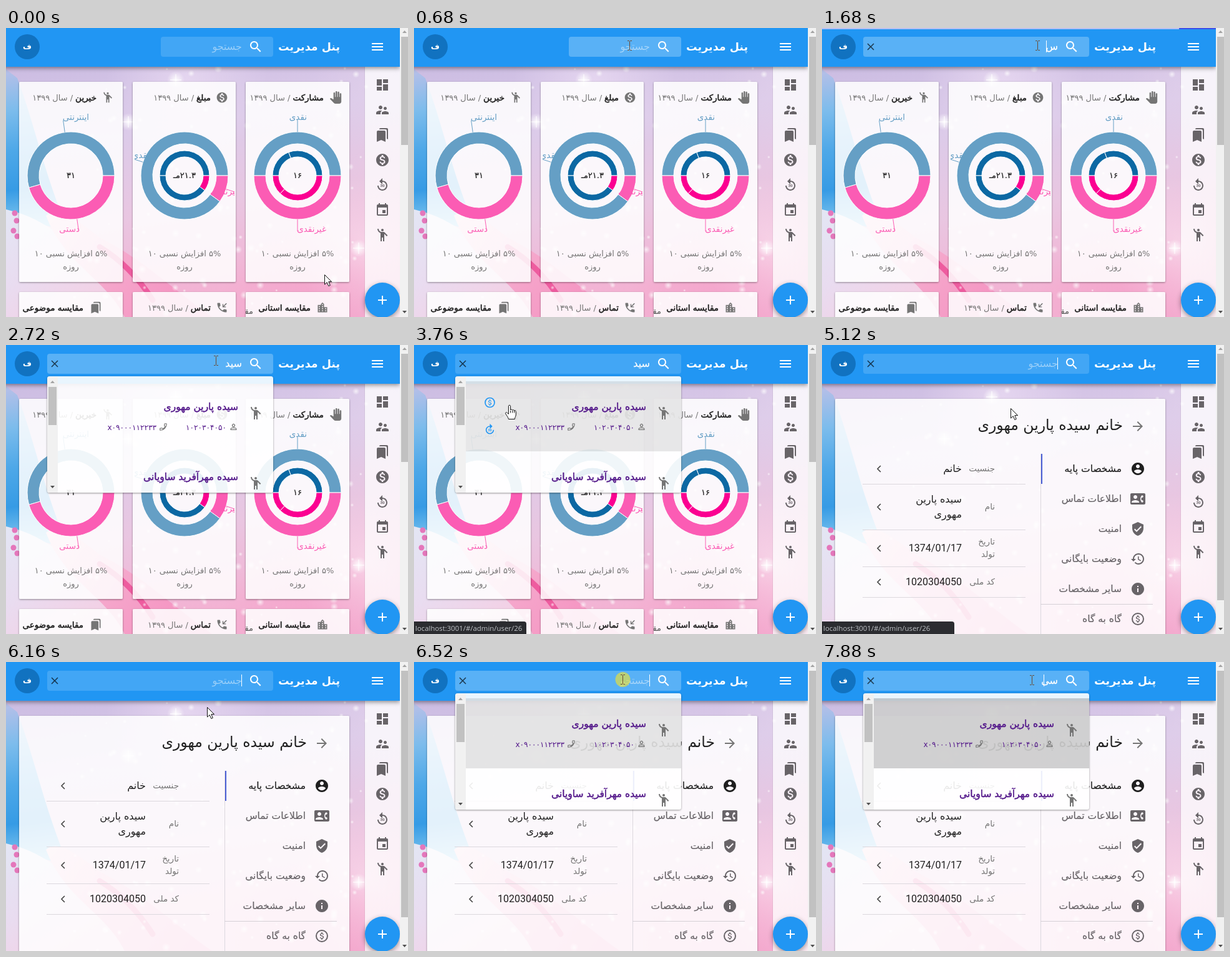
Recreate the animation shown at these times as an HTML page with a canvas. Size 644 px wide and 462 px high, loop 8 s.

```html
<!DOCTYPE html>
<html lang="fa">
<head>
<meta charset="utf-8">
<title>پنل مدیریت</title>
<style>
html, body { margin: 0; width: 100%; height: 100%; overflow: hidden; }
canvas { display: block; width: 644px; height: 462px; }
</style>
</head>
<body>
<canvas id="stage" width="644" height="462"></canvas>
<script>
const W = 644, H = 462, LOOP = 8000;
const screen2d = document.getElementById('stage').getContext('2d');
let c = screen2d;

const FA = '"DejaVu Sans", sans-serif';
const LATIN = 'Roboto, "DejaVu Sans", sans-serif';
const GREY = '#757575', INK = '#1f1f1f', PURPLE = '#551a8b';
const BLUE = '#2196f3', SKY = '#659fc5', ROSE = '#fb5cb4', NAVY = '#0c68a3', HOT = '#fb0091';

const PERSON = ['سیده پارین', 'مهوری'];
const FULL = PERSON.join(' ');
const SECOND = 'سیده مهرآفرید ساویانی';

const disc = 'M12 2C6.48 2 2 6.48 2 12s4.48 10 10 10 10-4.48 10-10S17.52 2 12 2z';
const dollar = 'M13.41 18.09V20h-2.67v-1.93c-1.71-.36-3.16-1.46-3.27-3.4h1.96c.1 1.05.82 1.87 2.65 1.87 1.96 0 2.4-.98 2.4-1.59 0-.83-.44-1.61-2.67-2.14-2.48-.6-4.18-1.62-4.18-3.67 0-1.72 1.39-2.84 3.11-3.21V4h2.67v1.95c1.86.45 2.79 1.86 2.85 3.39H14.3c-.05-1.11-.64-1.87-2.22-1.87-1.5 0-2.4.68-2.4 1.64 0 .84.65 1.39 2.67 1.91s4.18 1.39 4.18 3.91c-.01 1.83-1.38 2.83-3.12 3.16z';
const handset = 'M20 15.5c-1.25 0-2.45-.2-3.57-.57-.35-.11-.74-.03-1.02.24l-2.2 2.2c-2.83-1.44-5.15-3.75-6.59-6.59l2.2-2.21c.28-.26.36-.65.25-1C8.7 6.45 8.5 5.25 8.5 4c0-.55-.45-1-1-1H4c-.55 0-1 .45-1 1 0 9.39 7.61 17 17 17 .55 0 1-.45 1-1v-3.5c0-.55-.45-1-1-1z';
const shapes = {
  menu: 'M3 18h18v-2H3v2zm0-5h18v-2H3v2zm0-7v2h18V6H3z',
  search: 'M15.5 14h-.79l-.28-.27C15.41 12.59 16 11.11 16 9.5 16 5.91 13.09 3 9.5 3S3 5.91 3 9.5 5.91 16 9.5 16c1.61 0 3.09-.59 4.23-1.57l.27.28v.79l5 4.99L20.49 19l-4.99-5zm-6 0C7.01 14 5 11.99 5 9.5S7.01 5 9.5 5 14 7.01 14 9.5 11.99 14 9.5 14z',
  close: 'M19 6.41L17.59 5 12 10.59 6.41 5 5 6.41 10.59 12 5 17.59 6.41 19 12 13.41 17.59 19 19 17.59 13.41 12z',
  add: 'M19 13h-6v6h-2v-6H5v-2h6V5h2v6h6v2z',
  board: 'M3 13h8V3H3v10zm0 8h8v-6H3v6zm10 0h8V11h-8v10zm0-18v6h8V3h-8z',
  people: 'M16.5 12c1.38 0 2.49-1.12 2.49-2.5S17.88 7 16.5 7C15.12 7 14 8.12 14 9.5s1.12 2.5 2.5 2.5zM9 11c1.66 0 2.99-1.34 2.99-3S10.66 5 9 5C7.34 5 6 6.34 6 8s1.34 3 3 3zm7.5 3c-1.83 0-5.5.92-5.5 2.75V19h11v-2.25c0-1.83-3.67-2.75-5.5-2.75zM9 13c-2.33 0-7 1.17-7 3.5V19h7v-2.25c0-.85.33-2.34 2.37-3.47C10.5 13.1 9.66 13 9 13z',
  marks: 'M19 18l2 1V3c0-1.1-.9-2-2-2H8.99C7.89 1 7 1.9 7 3h10c1.1 0 2 .9 2 2v13zM15 5H5c-1.1 0-2 .9-2 2v16l7-3 7 3V7c0-1.1-.9-2-2-2z',
  money: disc + dollar,
  replay: 'M12 5V1L7 6l5 5V7c3.3 0 6 2.7 6 6s-2.7 6-6 6-6-2.7-6-6H4c0 4.4 3.6 8 8 8s8-3.6 8-8-3.6-8-8-8z',
  event: 'M17 12h-5v5h5v-5zM16 1v2H8V1H6v2H5c-1.11 0-1.99.9-1.99 2L3 19c0 1.1.89 2 2 2h14c1.1 0 2-.9 2-2V5c0-1.1-.9-2-2-2h-1V1h-2zm3 18H5V8h14v11z',
  waver: 'M14 4a2 2 0 1 1-4 0a2 2 0 1 1 4 0zM15.89 8.11C15.5 7.72 14.83 7 13.53 7h-2.54C8.24 6.99 6 4.75 6 2H4c0 3.16 2.11 5.84 5 6.71V22h2v-6h2v6h2V10.05L18.95 14l1.41-1.41-4.47-4.48z',
  palm: 'M23 5.5V20c0 2.2-1.8 4-4 4h-7.3c-1.08 0-2.1-.43-2.85-1.19L1 14.83s1.26-1.23 1.3-1.25c.22-.19.49-.29.79-.29.22 0 .42.06.6.16.04.01 4.31 2.46 4.31 2.46V4c0-.83.67-1.5 1.5-1.5S11 3.17 11 4v7h1V1.5c0-.83.67-1.5 1.5-1.5S15 .67 15 1.5V11h1V2.5c0-.83.67-1.5 1.5-1.5s1.5.67 1.5 1.5V11h1V5.5c0-.83.67-1.5 1.5-1.5s1.5.67 1.5 1.5z',
  city: 'M15 11V5l-3-3-3 3v2H3v14h18V11h-6zm-8 8H5v-2h2v2zm0-4H5v-2h2v2zm0-4H5V9h2v2zm6 8h-2v-2h2v2zm0-4h-2v-2h2v2zm0-4h-2V9h2v2zm0-4h-2V5h2v2zm6 12h-2v-2h2v2zm0-4h-2v-2h2v2z',
  callback: handset + 'M20 3.4L14.6 8.8V5H13v6.5h6.5V10H16l5.4-5.4z',
  forward: 'M12 4l-1.41 1.41L16.17 11H4v2h12.17l-5.58 5.59L12 20l8-8z',
  account: disc + 'M12 5c1.66 0 3 1.34 3 3s-1.34 3-3 3-3-1.34-3-3 1.34-3 3-3zm0 14.2c-2.5 0-4.71-1.28-6-3.22.03-1.99 4-3.08 6-3.08 1.99 0 5.97 1.09 6 3.08-1.29 1.94-3.5 3.22-6 3.22z',
  contact: 'M22 3H2C.9 3 0 3.9 0 5v14c0 1.1.9 2 2 2h20c1.1 0 1.99-.9 1.99-2L24 5c0-1.1-.9-2-2-2zM8 6c1.66 0 3 1.34 3 3s-1.34 3-3 3-3-1.34-3-3 1.34-3 3-3zm6 12H2v-1c0-2 4-3.1 6-3.1s6 1.1 6 3.1v1zm3.85-4h1.64L21 16l-1.99 1.99c-1.31-.98-2.28-2.38-2.73-3.99-.18-.64-.28-1.31-.28-2s.1-1.36.28-2c.45-1.62 1.42-3.01 2.73-3.99L21 8l-1.51 2h-1.64c-.22.63-.35 1.3-.35 2s.13 1.37.35 2z',
  shield: 'M12 1L3 5v6c0 5.55 3.84 10.74 9 12 5.16-1.26 9-6.45 9-12V5l-9-4zm-2 16l-4-4 1.41-1.41L10 14.17l6.59-6.59L18 9l-8 8z',
  history: 'M13 3c-4.97 0-9 4.03-9 9H1l3.89 3.89.07.14L9 12H6c0-3.87 3.13-7 7-7s7 3.13 7 7-3.13 7-7 7c-1.93 0-3.68-.79-4.94-2.06l-1.42 1.42C8.27 19.99 10.51 21 13 21c4.97 0 9-4.03 9-9s-4.03-9-9-9zm-1 5v5l4.28 2.54.72-1.21-3.5-2.08V8H12z',
  info: disc + 'M13 17h-2v-6h2v6zm0-8h-2V7h2v2z',
  dollar, handset,
  ring: 'M21 12a9 9 0 1 1-18 0a9 9 0 1 1 18 0z',
  user: 'M15.2 8a3.2 3.2 0 1 1-6.4 0a3.2 3.2 0 1 1 6.4 0zM5 19v-2c0-2 4-3 7-3s7 1 7 3v2z',
  chevron: 'M15.5 6L9.5 12L15.5 18'
};
const paths = {};
for (const k in shapes) paths[k] = new Path2D(shapes[k]);

function icon(name, x, y, size, color, line = 0, flip = 1) {
  const s = size / 24;
  c.save();
  c.translate(x, y);
  c.scale(s * flip, s);
  c.translate(-12, -12);
  if (line) {
    c.strokeStyle = color; c.lineWidth = line; c.stroke(paths[name]);
  } else {
    c.fillStyle = color; c.fill(paths[name], 'evenodd');
  }
  c.restore();
}

function box(x, y, w, h, color, r = 0) {
  c.fillStyle = color;
  c.beginPath();
  c.roundRect(x, y, w, h, r);
  c.fill();
}

function circle(x, y, r, color) {
  c.fillStyle = color;
  c.beginPath();
  c.arc(x, y, r, 0, 7);
  c.fill();
}

function shadow(blur, dy, alpha, draw) {
  c.save();
  c.shadowColor = `rgba(0,0,0,${alpha})`;
  c.shadowBlur = blur;
  c.shadowOffsetY = dy;
  draw();
  c.restore();
}

// Shadow only outside a translucent sheet
function sheet(x, y, w, h, color, r) {
  c.save();
  c.beginPath();
  c.rect(0, 0, W, H);
  c.roundRect(x, y, w, h, r);
  c.clip('evenodd');
  shadow(3, 1, .4, () => box(x, y, w, h, '#fff', r));
  c.restore();
  box(x, y, w, h, color, r);
}

// Returns the drawn width; heavy adds a thin outline for medium weight
function text(str, x, y, size, color, o = {}) {
  c.font = `${o.bold ? 'bold ' : ''}${size}px ${o.font || FA}`;
  c.direction = o.dir || 'rtl';
  c.textAlign = o.align || 'right';
  c.fillStyle = c.strokeStyle = color;
  c.fillText(str, x, y);
  if (o.heavy) { c.lineWidth = o.heavy; c.lineJoin = 'round'; c.strokeText(str, x, y); }
  return c.measureText(str).width;
}

function poly(points, color) {
  c.fillStyle = color;
  c.beginPath();
  points.forEach(p => c.lineTo(p[0], p[1]));
  c.closePath();
  c.fill();
}

function glow(x, y, r, rgb, a) {
  const g = c.createRadialGradient(x, y, 0, x, y, r);
  g.addColorStop(0, `rgba(${rgb},${a})`);
  g.addColorStop(1, `rgba(${rgb},0)`);
  c.fillStyle = g;
  c.fillRect(x - r, y - r, 2 * r, 2 * r);
}

function gradient(x0, y0, x1, y1, colors) {
  const g = c.createLinearGradient(x0, y0, x1, y1);
  colors.forEach((color, i) => g.addColorStop(i / (colors.length - 1), color));
  return g;
}

const backdrop = document.createElement('canvas');
backdrop.width = W; backdrop.height = H;

function paintBackdrop() {
  c = backdrop.getContext('2d');
  box(0, 0, W, H, gradient(0, 62, 60, H, ['#cbbce2', '#dccbe9', '#e9c6e1', '#f3b2d3']));
  glow(290, 80, 130, '240,225,246', .6);
  glow(570, 350, 110, '250,222,238', .7);
  glow(490, 460, 150, '246,140,190', .4);
  glow(600, 90, 110, '225,208,235', .7);

  // Blue paint on the left
  c.fillStyle = gradient(0, 70, 30, 320, ['#b4bfe8', '#7cbcec', '#4ea8e8', '#369be5', '#8ccdf0']);
  c.beginPath();
  c.moveTo(0, 66);
  c.lineTo(18, 80);
  c.bezierCurveTo(45, 150, 60, 230, 100, 325);
  c.lineTo(0, 300);
  c.fill();
  c.fillStyle = gradient(0, 290, 120, H, ['#e3e6f4', '#e9dcf0', '#f4cfe4']);
  c.beginPath();
  c.moveTo(0, 290);
  c.bezierCurveTo(40, 300, 80, 310, 240, H);
  c.lineTo(0, H);
  c.fill();

  // Reaching hand
  c.fillStyle = gradient(70, 290, 300, H, ['#f6cfe0', '#f5a6cb', '#f58fbf']);
  c.beginPath();
  c.moveTo(64, 300);
  c.bezierCurveTo(85, 282, 120, 312, 150, 335);
  c.bezierCurveTo(220, 370, 270, 420, 330, H);
  c.lineTo(190, H);
  c.bezierCurveTo(160, 400, 95, 380, 64, 300);
  c.fill();
  c.lineCap = 'round';
  c.strokeStyle = '#ee5c9f';
  c.lineWidth = 9;
  c.beginPath();
  c.moveTo(150, 350);
  c.quadraticCurveTo(200, 380, 235, 435);
  c.stroke();
  [[14, 296], [17, 308], [12, 324], [18, 333]].forEach(p => circle(...p, 4.5, '#e477bb'));

  let seed = 7;
  const rnd = () => (seed = seed * 16807 % 2147483647) / 2147483647;
  for (let i = 0; i < 110; i++) {
    glow(110 + rnd() * 470, 64 + rnd() * 398, 2 + rnd() * 5, '255,255,255', .7);
  }
  [[272, 83], [565, 352], [196, 150]].forEach(([x, y]) => {
    glow(x, y, 14, '255,255,255', .9);
    box(x - 9, y - .5, 18, 1, '#fff');
    box(x - .5, y - 9, 1, 18, '#fff');
  });
  c = screen2d;
}

const card = (x, y, w, h) => sheet(x, y, w, h, 'rgba(255,255,255,.86)', 2);

// Angles run counterclockwise in degrees from the right
function donut(x, y, outer, inner, slices) {
  const rad = a => -a * Math.PI / 180;
  slices.forEach(([a, b, color]) => {
    c.beginPath();
    c.arc(x, y, outer, rad(a), rad(b), true);
    c.arc(x, y, inner, rad(b), rad(a));
    c.closePath();
    c.fillStyle = color;
    c.fill();
    c.strokeStyle = '#fff';
    c.lineWidth = 1;
    c.stroke();
  });
}

function leader(x, y, deg, color) {
  const a = -deg * Math.PI / 180;
  c.strokeStyle = color;
  c.lineWidth = 1;
  c.beginPath();
  c.moveTo(x + 70 * Math.cos(a), y + 70 * Math.sin(a));
  c.lineTo(x + 89 * Math.cos(a), y + 89 * Math.sin(a));
  c.stroke();
}

function heading(title, x, y, year) {
  const w = text(title, x, y, 13.5, INK, { heavy: .5 });
  if (year) text('/ سال ۱۳۹۹', x - w - 4, y, 13, GREY);
}

function dashboard() {
  const xs = [21, 203, 384], mid = [104, 286, 467];
  xs.forEach((x, i) => {
    card(x, 86, i === 1 ? 165 : 166, 320);
    card(x, 422, i === 1 ? 165 : 166, 60);
    text('۵% افزایش نسبی ۱۰', mid[i], 365, 13, GREY, { align: 'center' });
    text('روزه', mid[i], 386, 13, GREY, { align: 'center' });
  });
  icon('waver', 163, 111, 20, GREY);
  icon('money', 346, 111, 20, GREY);
  icon('palm', 528, 111, 20, GREY);
  heading('خیرین', 145, 116, true);
  heading('مبلغ', 328, 116, true);
  heading('مشارکت', 509, 116, true);

  donut(104, 236, 70, 51, [[0, 196, SKY], [196, 360, ROSE]]);
  donut(286, 236, 70, 51, [[0, 324, SKY], [324, 360, ROSE]]);
  donut(286, 236, 40, 30, [[0, 180, NAVY], [180, 324, NAVY], [324, 360, HOT]]);
  donut(467, 236, 70, 51, [[0, 180, SKY], [180, 360, ROSE]]);
  donut(467, 236, 40, 30, [[0, 111, NAVY], [111, 180, NAVY], [180, 226, HOT], [226, 360, HOT]]);
  ['۳۱', '۲۱.۳مـ', '۱۶'].forEach((s, i) => text(s, mid[i], 240, 13, INK, { align: 'center', heavy: .2 }));

  leader(104, 236, 98, SKY);
  text('اینترنتی', 133, 147, 13.5, SKY);
  leader(104, 236, 278, ROSE);
  text('دستی', 118, 326, 13.5, ROSE);
  leader(467, 236, 90, SKY);
  text('نقدی', 482, 147, 13.5, SKY);
  leader(467, 236, 270, ROSE);
  text('غیرنقدی', 513, 326, 13.5, ROSE);
  c.save();
  c.beginPath();
  c.rect(206, 130, 160, 210);
  c.clip();
  leader(286, 236, 162, SKY);
  text('نقدی', 230, 208, 13.5, SKY);
  leader(286, 236, 342, ROSE);
  text('غیرنقدی', 374, 266, 13.5, ROSE);
  c.restore();

  icon('marks', 144, 447, 20, GREY);
  icon('callback', 346, 447, 20, GREY);
  icon('city', 507, 447, 20, GREY);
  heading('مقایسه موضوعی', 124, 452);
  heading('تماس', 328, 452, true);
  heading('مقایسه استانی', 488, 452);
  c.save();
  c.beginPath();
  c.rect(384, 422, 20, 40);
  c.clip();
  text('مقا', 396, 457, 13, '#555');
  c.restore();
}

function profile() {
  card(21, 86, 529, 400);
  text('خانم ' + FULL, 482, 136, 23.5, INK);
  icon('forward', 506, 130, 24, GREY);
  box(350, 174, 1, 288, '#dcd8de');
  box(351, 174, 2, 48, '#4a5fd6');
  [['مشخصات پایه', 'account'], ['اطلاعات تماس', 'contact'], ['امنیت', 'shield'],
   ['وضعیت بایگانی', 'history'], ['سایر مشخصات', 'info'], ['گاه به گاه', 'ring']].forEach(([label, ic], i) => {
    const y = 198 + 48 * i, color = i ? '#686468' : INK;
    text(label, 480, y + 5, 15.5, color, { heavy: .2 });
    icon(ic, 506, y, 24, color, ic === 'ring' ? 2 : 0);
  });
  icon('dollar', 506, 438, 17, '#686468');
  box(350, 414, 180, 1, '#d5d0d6');

  const rows = [[198, 222, ['جنسیت'], ['خانم']], [259, 295, ['نام'], PERSON],
    [325, 354, ['تاریخ', 'تولد'], ['1374/01/17']], [379, 403, ['کد ملی'], ['1020304050']]];
  rows.forEach(([y, line, label, value]) => {
    label.forEach((s, i) => text(s, 277, y + 4 + (i - (label.length - 1) / 2) * 20, 13.5, GREY));
    const latin = value[0] < 'A';
    value.forEach((s, i) => text(s, 224, y + 5 + (i - (value.length - 1) / 2) * 24, 16, INK,
      latin ? { font: LATIN, dir: 'ltr' } : {}));
    icon('chevron', 91, y, 20, '#444', 2);
    box(65, line, 261, 1, '#dcd8de');
  });
}

function replay(x, y, size, color, flip) {
  icon('replay', x, y, size, color, 0, flip);
  text('30', x, y + size * .145, size * .26, color, { font: LATIN, dir: 'ltr', align: 'center', bold: true });
}

function sidebar() {
  box(575, 62, 56, 400, 'rgba(255,255,255,.76)');
  box(574, 62, 1, 400, 'rgba(0,0,0,.06)');
  ['board', 'people', 'marks', 'money', 'replay', 'event', 'waver'].forEach((name, i) => {
    const y = 91 + 40 * i;
    if (name === 'replay') replay(603, y, 24, '#686468', 1);
    else icon(name, 603, y, 24, '#686468');
  });
  shadow(8, 3, .4, () => circle(603, 435, 28, BLUE));
  icon('add', 603, 435, 24, '#fff');
}

function pageScroll(s) {
  box(631, 0, 13, H, '#f1f1f1');
  box(633, 14, 11, (s.page ? 408 : 187) - 14, '#c1c1c1');
  poly([[635, 8], [642, 8], [638.5, 4]], '#a3a3a3');
  poly([[635, 452], [642, 452], [638.5, 456]], '#505050');
}

function header(s) {
  shadow(7, 2, .45, () => box(-10, 0, 641, 62, BLUE));
  if (s.bar) {
    box(0, 0, 631, 2, '#b5bff3');
    box(572, 0, 59, 2, '#3f51e8');
  }
  icon('menu', 595, 30, 24, '#fff');
  text('پنل مدیریت', 535, 36, 17.5, '#fff', { bold: true });
  circle(34, 30, 20, '#1172c0');
  text('ف', 34, 34, 12, '#fff', { align: 'center', bold: true });
  const left = s.wide ? 66 : 248;
  box(left, 14, 428 - left, 32, `rgba(255,255,255,${s.hover ? .25 : .15})`, 4);
  icon('search', 400, 30, 24, '#fff');
  if (s.wide) icon('close', 78, 30, 19, 'rgba(0,0,0,.68)');
  if (s.query) text(s.query, 378, 35, 16, '#fff', { heavy: .3 });
  else text('جستجو', 378, 35, 16, 'rgba(255,255,255,.45)');
  if (s.caret) box(s.caret, 20, 1, 19, '#fff');
}

function dropdown(s) {
  sheet(66, 50, 362, 186, 'rgba(255,255,255,.9)', 4);
  box(83, 58, 345, 112, `rgba(0,0,0,${s.shade})`);
  box(66, 51, 17, 185, '#f1f1f1', [4, 0, 0, 4]);
  box(68, 67, 13, 61, '#c1c1c1');
  poly([[71, 61], [78, 61], [74.5, 57]], '#a3a3a3');
  poly([[71, 225], [78, 225], [74.5, 229]], '#505050');
  c.save();
  c.beginPath();
  c.rect(83, 50, 345, 186);
  c.clip();
  icon('waver', 400, 109, 24, GREY);
  icon('waver', 400, 221, 24, GREY);
  text(FULL, 372, 104, 15.5, PURPLE, { heavy: .5 });
  text(SECOND, 372, 216, 15.5, PURPLE, { heavy: .5 });
  icon('user', 364.5, 131, 15, GREY, 2);
  text('۱۰۲۰۳۰۴۰۵۰', 353, 136, 12.1, PURPLE, { dir: 'ltr' });
  icon('handset', 252, 131, 14, GREY, 2, -1);
  text('x۰۹۰۰۰۱۱۲۲۳۳', 241, 136, 12.1, PURPLE, { dir: 'ltr' });
  if (s.acts) {
    icon('ring', 121.5, 92, 20, BLUE, 2);
    icon('dollar', 121.5, 92, 14, BLUE);
    replay(121.5, 135, 20, BLUE, -1);
  }
  c.restore();
}

function status(w) {
  box(0, 442, w, 20, '#2b2c30', [0, 4, 0, 0]);
  text('localhost:3001/#/admin/user/26', 2, 457, 11.4, '#c0c4c8',
    { font: '"Open Sans", "Noto Sans", sans-serif', dir: 'ltr', align: 'left' });
}

const pointers = {
  arrow: new Path2D('M.5 .5V16L4.2 12.6L6.8 18.5L9.3 17.4L6.8 11.6H11.6Z'),
  hand: new Path2D('M-1.6 1.5C-1.6 -.2 1.6 -.2 1.6 1.5V8C2 6.6 4.7 6.8 4.8 8.4C5.4 7.2 7.6 7.6 7.8 9.2C8.6 8.4 10.3 8.8 10.3 10.5V15C10.3 18 8.6 19 8.4 22.5H-1.6C-2 19.5 -4.5 17 -6.2 14C-7.2 12 -5.2 10.8 -3.6 12.4L-1.6 14.4Z'),
  beam: new Path2D('M-3.5 -7.5H-1L0 -6.5L1 -7.5H3.5M0 -6.5V6.5M-3.5 7.5H-1L0 6.5L1 7.5H3.5')
};

function pointer(s) {
  if (s.click) circle(s.x, s.y, 12, 'rgba(232,222,60,.68)');
  c.save();
  c.translate(s.x, s.y);
  c.lineWidth = 1;
  c.lineJoin = 'round';
  c.fillStyle = '#fff';
  c.strokeStyle = s.cur === 'beam' ? '#6b4a32' : '#111';
  if (s.cur !== 'beam') c.fill(pointers[s.cur]);
  c.stroke(pointers[s.cur]);
  if (s.cur === 'hand') {
    c.beginPath();
    [1.6, 4.8, 7.8].forEach(x => { c.moveTo(x, 9); c.lineTo(x, 12.5); });
    c.stroke();
  }
  c.restore();
}

// Each step keeps the values it does not name
const steps = [
  [0, { page: 0, wide: 0, hover: 0, query: '', caret: 0, drop: 0, shade: 0, acts: 0, status: 0, bar: 0, click: 0, cur: 'arrow', x: 510, y: 394 }],
  [320, { x: 357, y: 108 }],
  [680, { hover: 1, cur: 'beam', x: 345.5, y: 28 }],
  [1000, { wide: 1, caret: 377 }],
  [1360, { caret: 0 }],
  [1680, { query: 'س', caret: 359, bar: 1 }],
  [2040, { query: 'سید', caret: 351, bar: 0, drop: 1 }],
  [2360, { caret: 0 }],
  [2720, { x: 336.5, y: 25 }],
  [3080, { hover: 0, caret: 351, shade: .09, acts: 1, cur: 'hand', x: 311, y: 105 }],
  [3400, { status: 180, x: 215, y: 106 }],
  [3760, { caret: 0, x: 153, y: 96 }],
  [4080, { caret: 351, x: 248, y: 111 }],
  [4440, { x: 298, y: 102 }],
  [4800, { caret: 0, shade: .18 }],
  [5120, { page: 1, query: '', caret: 377, drop: 0, acts: 0, status: 212, cur: 'arrow', x: 302, y: 101 }],
  [5480, { caret: 0, status: 0, x: 304, y: 104 }],
  [5840, { x: 305, y: 104 }],
  [6160, { caret: 377, x: 322, y: 72 }],
  [6520, { hover: 1, drop: 1, shade: .1, click: 1, cur: 'beam', x: 334.5, y: 28 }],
  [6840, { click: 0, x: 336.5, y: 29 }],
  [7200, { caret: 0 }],
  [7880, { query: 'سی', caret: 355, shade: .18 }]
];

function stateAt(t) {
  const s = {};
  for (const [at, change] of steps) if (at <= t) Object.assign(s, change);
  return s;
}

function draw(t) {
  const s = stateAt(t);
  c.drawImage(backdrop, 0, 0);
  if (s.page) profile(); else dashboard();
  sidebar();
  header(s);
  if (s.drop) dropdown(s);
  pageScroll(s);
  if (s.status) status(s.status);
  pointer(s);
}

paintBackdrop();
const start = performance.now();
function tick() {
  draw((performance.now() - start) % LOOP);
  requestAnimationFrame(tick);
}
tick();
</script>
</body>
</html>
```
